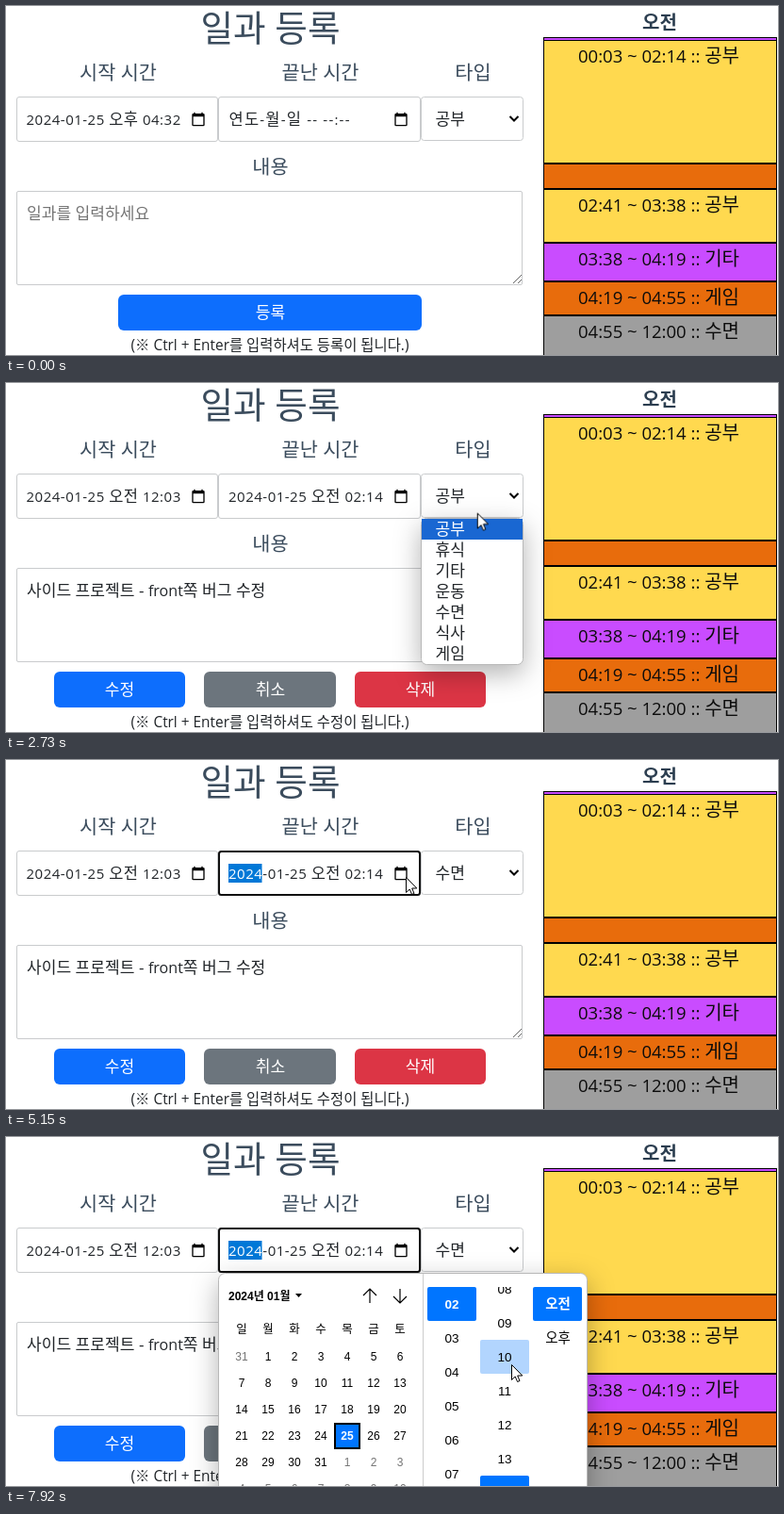
An HTML page for the animation above (7.99 s loop, 819 px wide and 370 px high).

```html
<!DOCTYPE html>
<html lang="ko">
<head>
<meta charset="utf-8">
<title>일과 등록</title>
<style>
@property --row { syntax: "<integer>"; inherits: true; initial-value: 0; }
html, body { margin: 0; width: 100%; height: 100%; overflow: hidden; background: #fff; }
svg { display: block; }
text { font: 17.1px "Open Sans", "Noto Sans CJK KR", "Noto Sans CJK JP", sans-serif; fill: #212529; white-space: pre; }
.mid { text-anchor: middle; }
.label { font-size: 20.8px; font-weight: 300; fill: #3b4c5d; }
.title { font-size: 37.6px; font-weight: 300; fill: #3b4c5d; }
.half { font-size: 20px; font-weight: 700; fill: #2c3e50; }
.date { font-size: 15px; letter-spacing: .5px; }
.date tspan { font-size: 16.5px; }
.empty { letter-spacing: 1.2px; }
.hint { fill: #757575; }
.slot text { font-size: 18.5px; fill: #0c0c0c; }
.slot tspan { font-size: 20px; }
.big { font-size: 20.5px; }
.lat { font-size: .94em; }
.note { font-size: 15.4px; }
.white, .white text { fill: #fff; }
.field { fill: #fff; stroke: #c9cbcd; }
.icon { fill: none; stroke: #000; stroke-width: 1.2; }
.popup { fill: #fff; stroke: #b8b8b8; filter: drop-shadow(0 9px 14px rgba(0,0,0,.3)); }
#cal text { font: 12px "Liberation Sans", "Noto Sans CJK KR", "Noto Sans CJK JP", sans-serif; fill: #000; }
#cal .time { font-size: 13.5px; }
#cal .ko { font-size: 14.5px; }
#cal .wd { font-size: 12.5px; }
#cal .dim { fill: #757575; }
#cal .bold { font-weight: 700; }
#cal .on { fill: #fff; font-weight: 700; }
.sel { fill: #0075ff; }

/* every animation shares one clock */
.a { animation: 7.99s step-end infinite; }
#new { animation-name: new; }
#edit { animation-name: edit; }
#study { animation-name: study; }
#sleep { animation-name: sleep; }
#tip { animation-name: tip; }
#list { animation-name: list, row; }
#focus { animation-name: focus; }
#cal { animation-name: cal; }
#up { animation-name: up; }
#down { animation-name: down; }
#mins { animation-name: scroll; }
#m2 { animation-name: m2; }
#m10 { animation-name: m10; }
#ring { animation-name: ring; }
#cursor { animation-name: move; }
#bar { transform: translateY(calc(var(--row) * 22px)); }
#lit { transform: translateY(calc(var(--row) * -22px)); }

@keyframes new { 0% { opacity: 1 } 20.39%, 100% { opacity: 0 } }
@keyframes edit { 0% { opacity: 0 } 20.39%, 100% { opacity: 1 } }
@keyframes study { 0% { opacity: 1 } 51.31%, 100% { opacity: 0 } }
@keyframes sleep { 0% { opacity: 0 } 51.31%, 100% { opacity: 1 } }
@keyframes tip { 0% { opacity: 0 } 8.38% { opacity: .5 } 9.25% { opacity: 1 } 22.14% { opacity: .5 } 23.02%, 100% { opacity: 0 } }
@keyframes list { 0% { opacity: 0 } 30.78% { opacity: 1 } 51.31%, 100% { opacity: 0 } }
@keyframes row {
  0% { --row: 0 } 35.3% { --row: 1 } 36.8% { --row: 2 } 38.3% { --row: 3 }
  40.29% { --row: 4 } 41.17% { --row: 5 } 45.5%, 100% { --row: 4 }
}
@keyframes focus { 0% { opacity: 0 } 63.57%, 100% { opacity: 1 } }
@keyframes cal { 0% { opacity: 0 } 65.33%, 100% { opacity: 1 } }
@keyframes up { 0% { opacity: 0 } 71.33% { opacity: 1 } 73.9%, 100% { opacity: 0 } }
@keyframes down { 0% { opacity: 0 } 73.9% { opacity: 1 } 74.8%, 100% { opacity: 0 } }
@keyframes m2 { 0% { opacity: 0 } 88.7% { opacity: 1 } 92.1%, 100% { opacity: 0 } }
@keyframes m10 { 0% { opacity: 0 } 99.1%, 100% { opacity: 1 } }
@keyframes ring {
  0% { opacity: 0 } 18.64% { opacity: 1 } 20.39% { opacity: 0 } 29.91% { opacity: 1 } 31.6% { opacity: 0 }
  50.43% { opacity: 1 } 51.31% { opacity: 0 } 62.7% { opacity: 1 } 63.57%, 100% { opacity: 0 }
}
@keyframes scroll {
  0% { transform: translateY(-504px) }
  79.09% { transform: translateY(-504px); animation-timing-function: steps(6) }
  84.35% { transform: translateY(-104px) }
  85.2% { transform: translateY(-104px); animation-timing-function: steps(3) }
  87.8% { transform: translateY(-4px) }
  91.23% { transform: translateY(-4px); animation-timing-function: steps(8) }
  98.24%, 100% { transform: translateY(-304px) }
}
@keyframes move {
  0% { transform: translate(760px, 390px) }
  3.25% { transform: translate(740px, 350px); animation-timing-function: steps(2) }
  5% { transform: translate(694px, 283px) }
  5.88% { transform: translate(672px, 225px) }
  6.75% { transform: translate(661px, 175px) }
  7.63% { transform: translate(657px, 121px) }
  21.27% { transform: translate(655px, 122px) }
  22.14% { transform: translate(590px, 128px) }
  23.02% { transform: translate(520px, 130px); animation-timing-function: steps(2) }
  24.78% { transform: translate(494px, 127px); animation-timing-function: steps(3) }
  27.4% { transform: translate(500px, 125px) }
  32.54% { transform: translate(500px, 125px); animation-timing-function: steps(8) }
  39.42% { transform: translate(498px, 226px) }
  40.29% { transform: translate(496px, 247px) }
  41.17% { transform: translate(494px, 264px); animation-timing-function: steps(2) }
  42.92% { transform: translate(493px, 269px); animation-timing-function: steps(5) }
  47.18% { transform: translate(491px, 246px) }
  51.31% { transform: translate(491px, 246px); animation-timing-function: steps(4) }
  54.8% { transform: translate(345px, 178px); animation-timing-function: steps(5) }
  59.32% { transform: translate(424px, 124px) }
  67.83% { transform: translate(424px, 124px); animation-timing-function: steps(4) }
  71.33% { transform: translate(392px, 164px); animation-timing-function: steps(2) }
  73.09% { transform: translate(388px, 172px); animation-timing-function: steps(3) }
  75.71% { transform: translate(455px, 186px); animation-timing-function: steps(2) }
  77.47% { transform: translate(514px, 193px) }
  79.09% { transform: translate(514px, 193px); animation-timing-function: steps(3) }
  81.72% { transform: translate(528px, 254px) }
  91.23% { transform: translate(528px, 254px); animation-timing-function: steps(8) }
  98.24%, 100% { transform: translate(536px, 241px) }
}
</style>
</head>
<body>
<svg width="819" height="370" viewBox="0 0 819 370">
  <defs>
    <path id="date-icon" fill-rule="evenodd" transform="scale(.6667)"
      d="M20 3h-1V1h-2v2H7V1H5v2H4q-2 0-2 2v16q0 2 2 2h16q2 0 2-2V5q0-2-2-2zM20 21H4V8h16z"/>
  </defs>

  <!-- form -->
  <text class="title mid" x="280.5" y="37">일과 등록</text>
  <text class="label mid" x="119" y="77.5">시작 시간</text>
  <text class="label mid" x="333.5" y="77.5">끝난 시간</text>
  <text class="label mid" x="495.5" y="77.5">타입</text>
  <text class="label mid" x="280.5" y="177.5">내용</text>
  <rect class="field" x="11.5" y="96.5" width="213" height="47" rx="2.5"/>
  <rect class="field" x="225.5" y="96.5" width="214" height="47" rx="2.5"/>
  <rect class="field" x="440.5" y="96.5" width="108" height="46" rx="3"/>
  <rect class="field" x="11.5" y="196.5" width="536" height="99" rx="1.5"/>
  <path d="M538 294l9-9M543 294l4-4" stroke="#666" fill="none"/>
  <use href="#date-icon" x="196" y="112"/>
  <use href="#date-icon" x="411" y="112"/>
  <path class="icon" d="M534.5 117l4.5 4.5 4.5-4.5" style="stroke-width:2"/>
  <text id="study" class="a" x="455.5" y="126">공부</text>
  <text id="sleep" class="a" x="455.5" y="126">수면</text>

  <g id="new" class="a">
    <text class="date" x="21.5" y="126">2024-01-25 <tspan>오후</tspan> 04:32</text>
    <text class="date empty" x="236.5" y="126"><tspan>연도</tspan>-<tspan>월</tspan>-<tspan>일</tspan> -- --:--</text>
    <text class="hint" x="22" y="226">일과를 입력하세요</text>
    <rect x="119" y="306" width="322" height="38" rx="6" fill="#0d6efd"/>
    <text class="white mid" x="280.5" y="331">등록</text>
    <text class="note mid" x="280" y="364.5">(※ Ctrl + Enter를 입력하셔도 등록이 됩니다.)</text>
  </g>

  <g id="edit" class="a">
    <text class="date" x="21.5" y="126">2024-01-25 <tspan>오전</tspan> 12:03</text>
    <text class="date" x="236" y="126">2024-01-25 <tspan>오전</tspan> 02:14</text>
    <text x="22" y="226">사이드 프로젝트 - <tspan class="lat">front</tspan>쪽 버그 수정</text>
    <rect x="51" y="306" width="139" height="38" rx="6" fill="#0d6efd"/>
    <rect x="210" y="306" width="140" height="38" rx="6" fill="#6c757d"/>
    <rect x="370" y="306" width="139" height="38" rx="6" fill="#dc3545"/>
    <g class="white mid">
      <text x="120.5" y="331">수정</text>
      <text x="280.5" y="331">취소</text>
      <text x="439.5" y="331">삭제</text>
    </g>
    <text class="note mid" x="280" y="364.5">(※ Ctrl + Enter를 입력하셔도 수정이 됩니다.)</text>
  </g>

  <g id="focus" class="a">
    <rect x="226" y="97" width="213" height="46" rx="2.5" fill="none" stroke="#101010" stroke-width="2"/>
    <rect x="236" y="110" width="35.5" height="20" fill="#0078d7"/>
    <text class="date white" x="236" y="126">2024</text>
  </g>

  <!-- day plan -->
  <text class="half mid" x="693.5" y="24.5">오전</text>
  <rect x="570" y="33" width="248" height="340"/>
  <g class="slot">
    <path fill="#c94cff" d="M571 34h246v2H571zM571 252h246v39H571z"/>
    <path fill="#ffd94f" d="M571 37h246v129H571zM571 195h246v55H571z"/>
    <path fill="#e86c0c" d="M571 168h246v25H571zM571 293h246v34H571z"/>
    <path fill="#9e9e9e" d="M571 329h246v41H571z"/>
    <text x="607" y="60">00:03 ~ 02:14 :: <tspan>공부</tspan></text>
    <text x="607" y="217.5">02:41 ~ 03:38 :: <tspan>공부</tspan></text>
    <text x="607" y="274.5">03:38 ~ 04:19 :: <tspan>기타</tspan></text>
    <text x="607" y="315.5">04:19 ~ 04:55 :: <tspan>게임</tspan></text>
    <text x="607" y="351.5">04:55 ~ 12:00 :: <tspan>수면</tspan></text>
  </g>

  <g id="tip" class="a">
    <rect x="378" y="16" width="180" height="71" rx="6"/>
    <path d="M557.5 46l6 6-6 6z"/>
    <text class="big white mid" x="468" y="42.5">사이드 프로젝트 -</text>
    <text class="big white mid" x="468" y="75"><tspan class="lat">front</tspan>쪽 버그 수정</text>
  </g>

  <!-- type menu -->
  <g id="list" class="a">
    <rect class="popup" x="440.5" y="143.5" width="108" height="155" rx="6"/>
    <g id="opts"></g>
    <g id="bar">
      <svg x="441" y="144" width="107" height="22" overflow="hidden">
        <rect width="107" height="22" fill="#1967d2"/>
        <g id="lit" class="white"></g>
      </svg>
    </g>
  </g>

  <!-- date and time picker -->
  <g id="cal" class="a">
    <rect class="popup" x="225.5" y="144.5" width="391" height="300" rx="7"/>
    <path d="M442.5 145v225" stroke="#ccc"/>
    <text class="bold" x="236" y="172.5">2024년 01월</text>
    <path d="M307 166h7l-3.5 4z"/>
    <rect id="up" class="a" x="372" y="154" width="28" height="28" rx="2" fill="#e4e4e4"/>
    <rect id="down" class="a" x="404" y="154" width="28" height="28" rx="2" fill="#e4e4e4"/>
    <path class="icon" d="M386 176v-15M379 168l7-7 7 7M418 161v15M411 169l7 7 7-7"/>
    <g id="days" class="mid"></g>
    <g id="hours" class="mid"></g>
    <rect class="sel" x="559" y="159" width="52" height="36" rx="2"/>
    <text class="ko on mid" x="585.5" y="182">오전</text>
    <text class="ko mid" x="585.5" y="217.5">오후</text>
    <svg x="503" y="159" width="52" height="211" overflow="hidden">
      <g id="mins" class="a mid">
        <rect class="sel" y="504" width="52" height="36" rx="2"/>
        <rect id="m2" class="a" y="72" width="52" height="36" rx="2" fill="#b2d5fe"/>
        <rect id="m10" class="a" y="360" width="52" height="36" rx="2" fill="#b2d5fe"/>
      </g>
    </svg>
  </g>

  <g id="cursor" class="a">
    <circle id="ring" class="a" r="12" fill="#ff0" fill-opacity=".47"/>
    <path d="M.5.5V16.5L4.2 13 6.6 18.5 9 17.5 6.7 12H11.8Z" fill="#fff" stroke="#000"/>
  </g>
</svg>
<script>
const $ = id => document.getElementById(id);
const two = n => String(n).padStart(2, '0');

function add(parent, tag, attrs, label = '') {
  const el = document.createElementNS('http://www.w3.org/2000/svg', tag);
  for (const k in attrs) el.setAttribute(k, attrs[k]);
  el.textContent = label;
  $(parent).append(el);
}

['공부', '휴식', '기타', '운동', '수면', '식사', '게임'].forEach((name, i) => {
  add('opts', 'text', { x: 455.5, y: 161 + 22 * i }, name);
  add('lit', 'text', { x: 14.5, y: 17 + 22 * i }, name);
});

[...'일월화수목금토'].forEach((name, i) =>
  add('days', 'text', { x: 250 + 28 * i, y: 207.5, class: 'wd' }, name));
add('days', 'rect', { x: 349, y: 304, width: 26, height: 26, class: 'sel', stroke: '#000', 'stroke-width': 2 });
for (let i = 0; i < 42; i++) {
  const inMonth = i > 0 && i < 32;
  const day = i === 0 ? 31 : inMonth ? i : i - 31;
  const cls = i === 25 ? 'on' : inMonth ? '' : 'dim';
  add('days', 'text', { x: 250 + 28 * (i % 7), y: 237.3 + 28 * Math.floor(i / 7), class: cls }, day);
}

add('hours', 'rect', { x: 447, y: 159, width: 52, height: 36, rx: 2, class: 'sel' });
for (let h = 2; h < 8; h++)
  add('hours', 'text', { x: 473, y: 182 + 36 * (h - 2), class: h === 2 ? 'time on' : 'time' }, two(h));
for (let m = 0; m < 21; m++)
  add('mins', 'text', { x: 26, y: 23 + 36 * m, class: m === 14 ? 'time on' : 'time' }, two(m));
</script>
</body>
</html>
```
